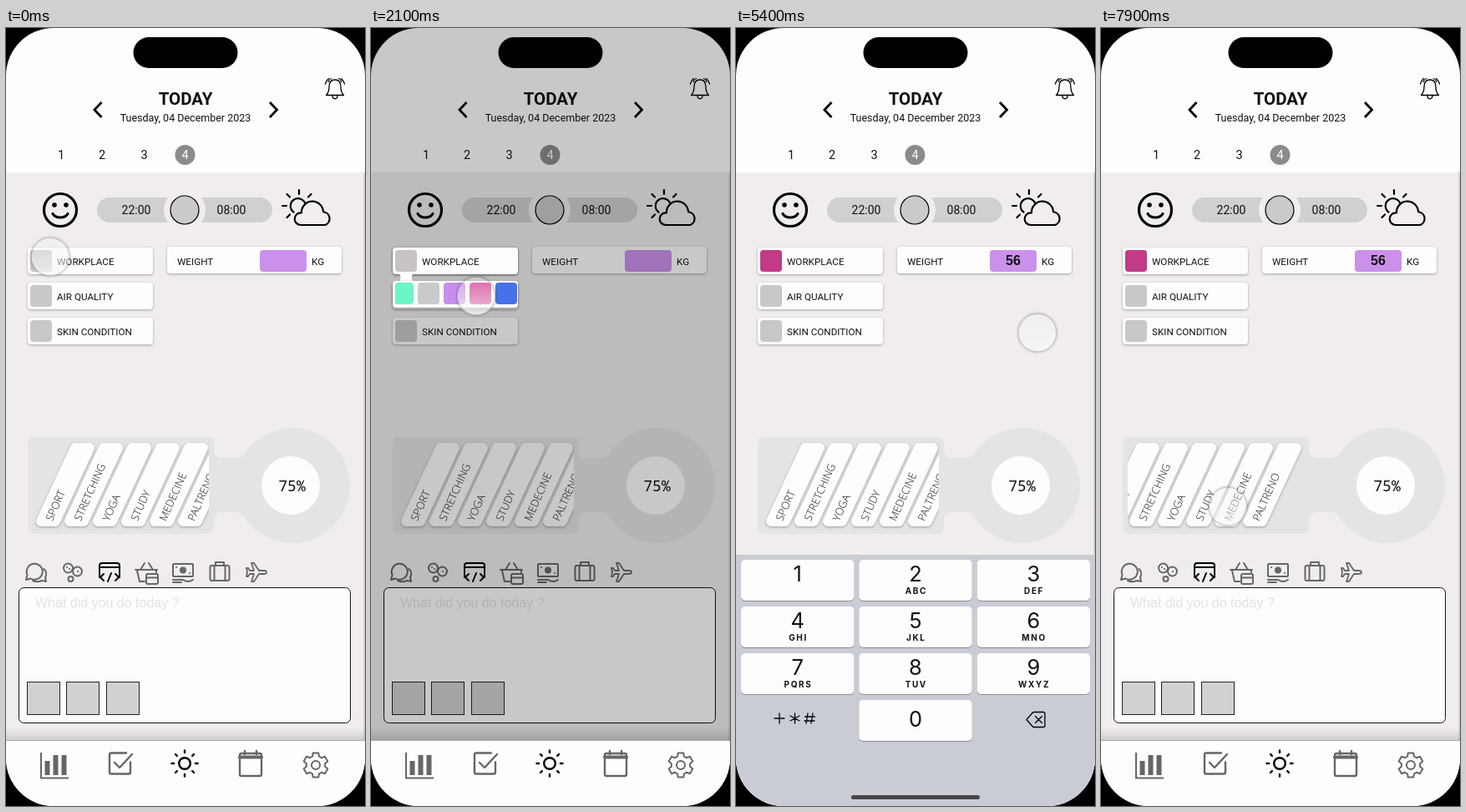
An HTML page that plays this animation: 430 by 932 pixels, repeating every 8000 ms.

```html
<!DOCTYPE html>
<html lang="en">
<head>
<meta charset="utf-8">
<title>Daily tracker</title>
<style>
html, body { margin: 0; width: 100%; height: 100%; overflow: hidden; background: #000; }
svg { display: block; width: 430px; height: 932px; }
text { font-family: Roboto, sans-serif; fill: #111; }
.mid { text-anchor: middle; }
.label { font-size: 11.7px; }
.card text { font: 300 12.8px "Open Sans", "Noto Sans", sans-serif; }
.line { fill: none; stroke: #666; stroke-width: 2; stroke-linecap: round; stroke-linejoin: round; }
.dark { stroke: #000; }
.thin { stroke-width: 1.3; }
.lift { filter: drop-shadow(0 1px 1.5px rgba(0,0,0,.32)); }
.key { font: 25.5px Inter, sans-serif; text-anchor: middle; }
.sub { font: 700 10px Inter, sans-serif; letter-spacing: 1.6px; text-anchor: middle; }
</style>
</head>
<body>
<svg viewBox="0 0 430 932">
  <defs>
    <clipPath id="screen"><rect width="430" height="932" rx="57"/></clipPath>
    <clipPath id="listClip"><rect x="32" y="490" width="211" height="116"/></clipPath>
    <clipPath id="pickClip"><rect x="29" y="304" width="146" height="30" rx="4"/></clipPath>
    <linearGradient id="shade" x2="0" y2="1">
      <stop stop-opacity="0"/><stop offset="1" stop-opacity=".13"/>
    </linearGradient>
    <linearGradient id="glass" x2="0" y2="1">
      <stop stop-color="#f2f2f2" stop-opacity=".25"/><stop offset="1" stop-color="#f8f8f8" stop-opacity=".75"/>
    </linearGradient>
  </defs>
  <rect width="430" height="932"/>
  <g clip-path="url(#screen)">
    <rect width="430" height="932" fill="#fdfdfd"/>
    <rect y="173" width="430" height="680" fill="#f1edef"/>
    <rect x="428.5" y="173" width="1.5" height="680" fill="#cfcbcd"/>

    <!-- header -->
    <text class="mid" x="215" y="91.5" font-size="20.5" font-weight="700">TODAY</text>
    <text class="mid" x="215" y="112" font-size="12.5">Tuesday, 04 December 2023</text>
    <path fill="none" stroke="#000" stroke-width="2.8" d="M114.500 89l-8.500 9 8.500 9M316 89l8.500 9-8.500 9"/>
    <g class="line dark thin">
      <path d="M383.500 80.500c3-3 3.500-5 3.500-10 0-6 3-8.500 7-8.500s7 2.500 7 8.500c0 5 .5 7 3.500 10zM391 81c0 5 6 5 6 0"/>
      <path d="M386 64.500q1-3 3.500-4M402 64.500q-1-3-3.500-4M382.500 67q1-4 4-6.500M405.500 67q-1-4-4-6.500"/>
    </g>
    <circle cx="214.500" cy="152" r="12" fill="#8b8b8b"/>
    <g class="mid" font-size="14.500">
      <text x="66" y="157">1</text><text x="115" y="157">2</text><text x="165.500" y="157">3</text>
      <text x="214.500" y="157" style="fill:#fff">4</text>
    </g>

    <!-- mood, sleep, weather -->
    <g class="line dark" style="stroke-width:3.200">
      <circle cx="65" cy="218" r="19.500"/>
      <path d="M56 222.500a10 8 0 0 0 18 0"/>
    </g>
    <circle cx="58" cy="212" r="2.800"/><circle cx="72" cy="212" r="2.800"/>
    <rect x="109" y="203" width="210" height="30" rx="15" fill="#d0d0d0"/>
    <circle cx="214" cy="218" r="25" fill="#f1edef"/>
    <circle cx="214" cy="218" r="17" fill="#cacaca" stroke="#000" stroke-width="1.200"/>
    <g class="mid" font-size="14"><text x="156" y="223">22:00</text><text x="270" y="223">08:00</text></g>
    <g class="line dark" style="stroke-width:2.200">
      <path d="M344.500 220.500a9 9 0 1 1 14-9.500M351 194v5M336.500 199l3.500 3.500M365.500 199l-3.500 3.500M331 213h5M336.500 227l3.500-3.500"/>
      <path d="M353 236a7.300 7.300 0 0 1 0-14.600h1a13 13 0 0 1 26-1.400q1 .5 1 .5a8 8 0 0 1 1 15.500z"/>
    </g>

    <!-- chips -->
    <g id="chips"></g>
    <rect class="lift" x="193" y="262" width="209" height="32" rx="4" fill="#fdfdfd"/>
    <rect x="304" y="266" width="56" height="26" rx="4" fill="#cb91ea"/>
    <text class="label" x="205" y="283.500">WEIGHT</text>
    <text class="label" x="366" y="283.500">KG</text>
    <text id="weight" class="mid" x="332" y="283.500" style="font:700 16px 'Liberation Sans',Arial,sans-serif"></text>

    <!-- habits -->
    <g fill="#e5e4e5">
      <rect x="26" y="490" width="223" height="116" rx="7"/>
      <circle cx="343" cy="548" r="69"/>
      <path d="M248 503q1 12 10 12h16q18 0 28-20v106q-10-21-28-21h-16q-9 0-10 12z"/>
    </g>
    <circle cx="341" cy="548" r="35" fill="#fdfdfd"/>
    <text class="mid" x="342.500" y="554.500" style="font:500 18px 'Noto Sans Mono',monospace">75%</text>
    <g clip-path="url(#listClip)"><g id="list" class="card"></g></g>

    <!-- category icons -->
    <g class="line">
      <path d="M24 661l1.500-6a9.500 9.500 0 1 1 4 4.500zM45.500 648a8 8 0 0 1 1.500 10l1 5-5-1q-6 2.500-11 0"/>
      <circle cx="74.500" cy="647" r="5.500"/><circle cx="85.500" cy="651" r="5.500"/><circle cx="77.500" cy="660" r="3"/>
      <path d="M73 646h.1M76 648h.1M86 651h.1"/>
      <path class="dark" d="M112 658v-14q0-3 3-3h18q3 0 3 3v14M112 646h24M117 654l-4 4 4 4M131 654l4 4-4 4M126 653l-4 10"/>
      <path d="M155 649h26M161 649l5-8M176 649l-5-8M157 650l3 13h6M180 650v2"/>
      <rect x="168" y="654" width="14" height="12" rx="2"/><path d="M168 658.500h14"/>
      <rect x="200" y="642" width="24" height="15" rx="1"/><circle cx="212" cy="649.500" r="3" fill="#666"/>
      <path d="M204 646h.1M220 653h.1M200 661h12q6 4 12 0M200 664h10"/>
      <rect x="244.500" y="644" width="23" height="18" rx="2"/><path d="M251 643v-3h10v3M249.500 644v18M262.500 644v18"/>
      <path style="stroke-width:1.800" d="M312 652q0-2-3-2h-6l-6-9h-3l3 9h-5l-2-3h-2l1 5-1 5h2l2-3h5l-3 9h3l6-9h6q3 0 3-2z"/>
    </g>

    <!-- note -->
    <rect x="15.500" y="670.500" width="397" height="162" rx="6" fill="#fdfdfd" stroke="#111"/>
    <text x="35" y="694" style="font:16px 'Liberation Sans',Arial,sans-serif;fill:#e2e2e2">What did you do today ?</text>
    <g fill="#d1d1d1" stroke="#222">
      <rect x="25.500" y="783.500" width="39" height="39"/><rect x="72.500" y="783.500" width="39" height="39"/><rect x="120.500" y="783.500" width="39" height="39"/>
    </g>
    <rect y="838" width="430" height="15" fill="url(#shade)"/>
    <rect id="dim" width="430" height="853" opacity="0"/>

    <!-- navigation -->
    <rect y="853" width="430" height="79" fill="#fdfdfd"/>
    <path d="M0 853.500h430" stroke="#aaa"/>
    <path d="M42 868v30.500h33" fill="none" stroke="#666" stroke-width="2"/>
    <path d="M49.500 878v17M59.500 871v24M69.500 871v24" stroke="#666" stroke-width="6"/>
    <g class="line" style="stroke-width:2.400">
      <path d="M144 868.500h-18q-2 0-2 2v21q0 2 2 2h21q2 0 2-2v-12M130 880l6 6 15-16"/>
      <rect x="280" y="869" width="26" height="27" rx="2"/><path d="M280 873.500h26" style="stroke-width:4"/><path d="M286 866v4M300 866v4"/>
      <circle cx="371" cy="883" r="5" style="stroke-width:2"/><path id="gear" style="stroke-width:2"/>
      <g class="dark"><circle cx="214" cy="881" r="6.800"/><path id="rays"/></g>
    </g>

    <!-- colour picker -->
    <g id="front" opacity="0"></g>
    <g id="picker" opacity="0">
      <path d="M33 294q5 5 0 10h18q-5-5 0-10z" fill="#fdfdfd"/>
      <rect class="lift" x="26" y="303" width="150" height="32" rx="4" fill="#fdfdfd"/>
      <g clip-path="url(#pickClip)"><g id="colors"></g></g>
    </g>

    <!-- keypad -->
    <g id="pad">
      <rect y="631" width="430" height="301" fill="#caccd5"/>
      <g id="keys"></g>
      <path class="line dark thin" d="M46 827h12M52 821v12M70.500 821v12M65 824l11 6M65 830l11-6M86 821l-2 12M92 821l-2 12M82.500 825h12M82 830h12"/>
      <path class="line dark thin" d="M348 828.500l7-8q1-1 2-1h11q2 0 2 2v14q0 2-2 2h-11q-1 0-2-1zM358.500 824.500l8 8M366.500 824.500l-8 8"/>
      <rect x="138" y="919" width="154" height="5" rx="2.500" fill="#47474a"/>
    </g>

    <rect x="152.500" y="11" width="125" height="37" rx="18.500"/>
    <g id="touch">
      <circle r="23.500" fill="none" stroke="#000" stroke-opacity=".06" stroke-width="4"/>
      <circle r="23" fill="url(#glass)" stroke="#000" stroke-opacity=".2"/>
    </g>
  </g>
</svg>
<script>
const $ = id => document.getElementById(id);
const LOOP = 8000, STEP = 100;

const chip = (label, y) => `<rect class="lift" x="26" y="${y}" width="150" height="32" rx="4" fill="#fdfdfd"/>
  <rect x="29" y="${y + 3}" width="26" height="26" rx="4" fill="#c8c8c8"/>
  <text class="label" x="61" y="${y + 20.5}">${label}</text>`;
const picked = '<rect class="picked" x="29" y="266" width="26" height="26" rx="4" fill="#c33a87" opacity="0"/>';
$('chips').innerHTML = chip('WORKPLACE', 263) + picked + chip('AIR QUALITY', 305) + chip('SKIN CONDITION', 347);
$('front').innerHTML = chip('WORKPLACE', 263) + picked;

$('list').innerHTML = ['SPORT', 'STRETCHING', 'YOGA', 'STUDY', 'MEDECINE', 'PALTRENO'].map((name, i) =>
  `<g transform="translate(${i * 34})"><path class="lift" d="M42 591L83 503H100L59 591Z" fill="#fdfdfd" stroke="#fdfdfd" stroke-width="12" stroke-linejoin="round"/>
  <text transform="translate(55.5 591.5) rotate(-66)">${name}</text></g>`).join('');

$('colors').innerHTML = ['#6bf5c5', '#cacaca', '#c88eec', '#d3348d', '#4672e8'].map((c, i) =>
  `<rect x="${25 + i * 31}" y="305" width="26" height="26" rx="4" fill="${c}"/>`).join('');

const subs = ['', 'ABC', 'DEF', 'GHI', 'JKL', 'MNO', 'PQRS', 'TUV', 'WXYZ'];
const key = (n, col, row, sub) => {
  const x = 6 + col * 141.3, y = 637 + row * 56, mid = x + 67.7;
  return `<rect x="${x}" y="${y + 1}" width="135.4" height="49" rx="5" fill="#8b8c91"/>
    <rect x="${x}" y="${y}" width="135.4" height="49" rx="5" fill="#fdfdfd"/>
    <text class="key" x="${mid}" y="${y + (n ? 26 : 32)}">${n}</text><text class="sub" x="${mid + 0.8}" y="${y + 41}">${sub}</text>`;
};
$('keys').innerHTML = subs.map((s, i) => key(i + 1, i % 3, i / 3 | 0, s)).join('') + key(0, 1, 3, '');

const polar = (cx, cy, r, a) => `${(cx + r * Math.cos(a)).toFixed(1)} ${(cy + r * Math.sin(a)).toFixed(1)}`;
let gear = '', rays = '';
for (let i = 0; i < 6; i++) {
  const a = (i + .5) * Math.PI / 3;
  [[-.36, 11.2], [-.22, 15], [.22, 15], [.36, 11.2]].forEach(([d, r]) => gear += (gear ? 'L' : 'M') + polar(371, 883, r, a + d));
}
for (let i = 0; i < 8; i++) {
  const a = i * Math.PI / 4;
  rays += `M${polar(214, 881, 13, a)}L${polar(214, 881, 15.5, a)}`;
}
$('gear').setAttribute('d', gear + 'Z');
$('rays').setAttribute('d', rays);

// Rows are [time, value, ...]; values ease between neighbouring rows.
const tracks = {
  touch: [[0, 53, 274], [400, 53, 276], [800, 54, 314], [1100, 18, 316], [1300, 16, 316], [1800, 90, 318],
    [2100, 126, 321], [2300, 128, 321], [2700, 245, 306], [3000, 332, 289], [4500, 332, 289], [4600, 362, 324],
    [4700, 362, 324], [4900, 361, 365], [5600, 361, 365], [6300, 261, 571], [6600, 261, 571], [7500, 152, 573]],
  dim: [[300, 0], [700, .21], [2200, .21], [2500, 0]],
  picker: [[300, 0], [700, 1], [2200, 1], [2500, 0]],
  colors: [[800, 0], [1100, -12], [1300, -12], [1600, 0]],
  picked: [[2070, 0], [2400, 1]],
  pad: [[3200, 301], [3650, 0], [5700, 0], [6150, 301]],
  list: [[6600, 0], [7400, -36]]
};
const ease = p => p * p * (3 - 2 * p);
function at(rows, t) {
  const i = rows.findIndex(r => r[0] > t);
  if (i < 0) return rows[rows.length - 1].slice(1);
  if (i === 0) return rows[0].slice(1);
  const [a, b] = [rows[i - 1], rows[i]], p = ease((t - a[0]) / (b[0] - a[0]));
  return a.slice(1).map((v, k) => v + (b[k + 1] - v) * p);
}
const move = (id, x, y = 0) => $(id).setAttribute('transform', `translate(${x} ${y})`);
const fade = (el, v) => el.setAttribute('opacity', v);
const swatches = document.querySelectorAll('.picked');

function draw(t) {
  const v = name => at(tracks[name], t);
  move('touch', ...v('touch'));
  fade($('dim'), v('dim')[0]);
  const open = v('picker')[0];
  fade($('front'), open);
  fade($('picker'), open);
  move('picker', 0, (open - 1) * 8);
  move('colors', v('colors')[0]);
  swatches.forEach(s => fade(s, v('picked')[0]));
  move('pad', 0, v('pad')[0]);
  move('list', v('list')[0]);
  $('weight').textContent = t < 4200 ? '' : t < 4400 ? '5' : '56';
}
const start = performance.now();
function tick() {
  const t = (performance.now() - start) % LOOP;
  draw(Math.floor(t / STEP) * STEP);
  requestAnimationFrame(tick);
}
tick();
</script>
</body>
</html>
```
